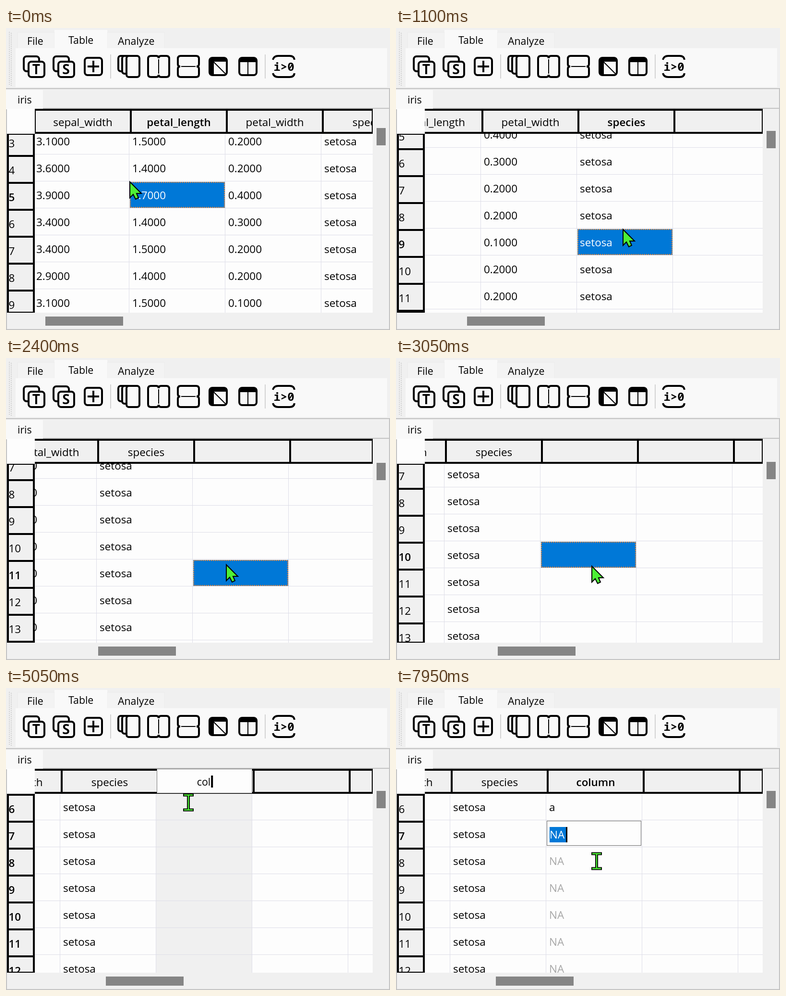
Write an HTML page that moves like this. It is 800 px wide and 628 px high and loops after 8 s.

```html
<!DOCTYPE html>
<html lang="en">
<head>
<meta charset="utf-8">
<title>Table editor</title>
<style>
html, body { margin: 0; width: 800px; height: 628px; overflow: hidden; background: #f0f0f0; }
svg { display: block; font: 22.4px "Open Sans", "Noto Sans", sans-serif; }
text { white-space: pre; }
.tab { font-size: 21.3px; }
.mid { text-anchor: middle; }
.bold { font-weight: 600; }
.na { fill: #a8a8a8; }
.on { fill: #fff; }
.line { fill: none; stroke: #000; stroke-width: 4; stroke-linejoin: round; }
.thin { fill: none; stroke: #000; stroke-width: 2; }
.face { fill: #f9f9f9; stroke: #000; stroke-width: 4; }
.glyph { font: bold 28px "Noto Sans Mono", "DejaVu Sans Mono", monospace; text-anchor: middle; }
.bar { fill: #858585; }
.grid { fill: none; stroke: #dedee8; }
</style>
</head>
<body>
<svg width="800" height="628" viewBox="0 0 800 628">
  <defs>
    <clipPath id="headClip"><rect x="60" y="168" width="704" height="52"/></clipPath>
    <clipPath id="rowClip"><rect x="2" y="220" width="58" height="372"/></clipPath>
    <clipPath id="bodyClip"><rect x="60" y="220" width="704" height="372"/></clipPath>
    <path id="pair" d="M-16-22H-5Q0-22 0-17Q0-22 5-22H16Q22-22 22-16V16Q22 22 16 22H5Q0 22 0 17Q0 22-5 22H-16Q-22 22-22 16V-16Q-22-22-16-22Z"/>
  </defs>

  <rect width="800" height="628" fill="#f0f0f0"/>
  <path d="M7 8V120M11 10V120" stroke="#cfcfcf" stroke-width="2" stroke-dasharray="2 2"/>
  <rect x="20" y="42" width="774" height="81" fill="#f9f9f9"/>
  <path d="M24 42V9H101V42M211 42V9H330V42" fill="#f3f3f3" stroke="#ebebeb"/>
  <path d="M101 44V4H211V44Z" fill="#f9f9f9"/>
  <g class="tab">
    <text x="44" y="35">File</text>
    <text x="130" y="33">Table</text>
    <text x="233" y="35">Analyze</text>
  </g>

  <g class="face">
    <rect x="37" y="59" width="32" height="31" rx="6"/>
    <rect x="47" y="70" width="33" height="32" rx="6"/>
    <rect x="99" y="59" width="32" height="31" rx="6"/>
    <rect x="109" y="70" width="33" height="32" rx="6"/>
    <rect x="164" y="62" width="36" height="36" rx="6"/>
    <rect x="234" y="58" width="26" height="32" rx="5"/>
    <rect x="242" y="58" width="26" height="37" rx="5"/>
    <rect x="251" y="58" width="27" height="44" rx="5"/>
    <use href="#pair" x="318" y="80"/>
    <use href="#pair" transform="translate(380 80) rotate(90)"/>
    <rect x="424" y="62" width="36" height="36" rx="6"/>
    <rect x="486" y="62" width="36" height="36" rx="6"/>
  </g>
  <path class="line" d="M170 80H194M182 68V92M556 66Q558 58 567 58H591Q600 58 601 66M556 94Q558 102 567 102H591Q600 102 601 94"/>
  <path class="thin" d="M318 65V95M365 80H395M432 70L459 97M504 70V97"/>
  <path d="M424 62H460V70H433V98H424ZM486 62H522V71H486Z"/>
  <path d="M218 55V105M540 55V105" stroke="#d3d3d3" stroke-width="2"/>
  <g class="glyph">
    <text x="63" y="96">T</text>
    <text x="125" y="96">S</text>
    <text x="579" y="89" font-size="24" style="font-size:24px">i&gt;0</text>
  </g>

  <path d="M0 126H800M77 167H800M1 167V628M799 126V628M0 627H800" stroke="#c3c3c3" stroke-width="2"/>
  <rect y="129" width="77" height="40" fill="#f9f9f9"/>
  <text class="tab" x="24" y="157">iris</text>

  <rect x="2" y="168" width="762" height="424" fill="#fdfdfd"/>
  <g clip-path="url(#bodyClip)"><g id="body"></g></g>
  <g clip-path="url(#headClip)">
    <rect x="60" y="168" width="704" height="52" fill="#f0f0f0"/>
    <g id="head"></g>
    <path d="M60 170H764M60 218H764" stroke="#000" stroke-width="4"/>
    <path d="M763 168V220" stroke="#000" stroke-width="2"/>
    <g id="nameEdit">
      <rect x="314.5" y="168.5" width="198" height="50" fill="#fdfdfd" stroke="#777"/>
      <text class="tab mid" id="name" x="412" y="203"></text>
      <rect id="nameCaret" y="182" width="4" height="25"/>
    </g>
  </g>
  <g clip-path="url(#rowClip)">
    <rect x="2" y="220" width="58" height="372" fill="#f0f0f0"/>
    <g id="rows"></g>
    <path d="M4 220V592M58 220V592" stroke="#000" stroke-width="4"/>
    <path d="M2 221H60M2 591H60" stroke="#000" stroke-width="2"/>
  </g>
  <rect class="bar" id="hBar" y="600" width="162" height="19"/>
  <rect class="bar" id="vBar" x="772" width="19" height="36"/>

  <path id="arrow" d="M0 0V33L7 26L12 36L18 33L14 24H24Z" fill="#4df035" stroke="#000" stroke-width="2"/>
  <g id="beam" fill="none" stroke-linecap="square">
    <path d="M-8-15.5H8M0-15V15M-8 15.5H8" stroke="#000" stroke-width="6"/>
    <path d="M-8-15.5H8M0-15V15M-8 15.5H8" stroke="#4df035" stroke-width="2.4"/>
  </g>
</svg>
<script>
const $ = id => document.getElementById(id);
const LOOP = 8000, STEP = 50, ROWS = 18, COLS = 9;
const ACTIVE = '#0078d7', TINT = '#f0f0f0';
const titles = ['', 'sepal_width', 'petal_length', 'petal_width', 'species'];
const data = [
  [],
  [3.5, 3, 3.2, 3.1, 3.6, 3.9, 3.4, 3.4, 2.9, 3.1, 3.7, 3.4, 3, 3, 4, 4.4, 3.9, 3.5],
  [1.4, 1.4, 1.3, 1.5, 1.4, 1.7, 1.4, 1.5, 1.4, 1.5, 1.5, 1.6, 1.4, 1.1, 1.2, 1.5, 1.3, 1.4],
  [.2, .2, .2, .2, .2, .4, .3, .2, .2, .1, .2, .2, .1, .1, .2, .4, .4, .3]
];

// time, scroll x, scroll y, pointer x, pointer y
const keys = [
  [0, 0, 0, 258, 320],
  [550, 238, -12, 430, 412],
  [1600, 312, 246, 489, 423],
  [3050, 556, 218, 408, 433],
  [3400, 544, 156, 353, 228],
  [3650, 544, 156, 371, 204],
  [5900, 544, 156, 371, 204],
  [5950, 544, 156, 377, 260],
  [7500, 544, 156, 377, 260],
  [7750, 544, 156, 409, 312],
  [7950, 544, 156, 409, 326]
];

const left = c => 60 + 200 * (c - 1);
const rowTop = r => 38 + 56 * r;
const value = (c, r) => c < 4 ? data[c][r].toFixed(4) : c === 4 ? 'setosa' : '';

function build() {
  let grid = '', cells = '', heads = '', rows = '';
  for (let c = 1; c < COLS; c++) {
    grid += `M${left(c) - 3.5} 0V1100`;
    heads += `<path d="M${left(c)} 168V220" stroke="#000" stroke-width="4"/>
      <text class="mid" id="h${c}" x="${left(c) + 100}" y="204">${titles[c] || ''}</text>`;
  }
  for (let r = 0; r < ROWS; r++) {
    const y = rowTop(r);
    grid += `M0 ${y + .5}H2000`;
    rows += `<path d="M2 ${y + 4}H60" stroke="#000" stroke-width="4"/>
      <text id="r${r}" x="5.5" y="${y + 42}">${r}</text>`;
    for (let c = 1; c < 6; c++)
      cells += `<text id="c${c}_${r}" x="${left(c) + 3}" y="${y + 38}">${value(c, r)}</text>`;
  }
  $('body').innerHTML = `<rect id="sel"/><path class="grid" d="${grid}"/>
    <rect id="focus" width="196" height="52" fill="none" stroke="#ff8728" stroke-width="2" stroke-dasharray="2 2"/>
    ${cells}
    <g id="cellEdit">
      <rect x="2.5" y="2.5" width="196" height="51" fill="#fdfdfd" stroke="#666"/>
      <rect id="mark" x="8" y="15" width="34" height="32" fill="${ACTIVE}"/>
      <text id="cellText" x="8" y="39"></text>
      <rect id="cellCaret" y="15" width="3" height="32"/>
    </g>`;
  $('head').innerHTML = heads;
  $('rows').innerHTML = rows;
}

// Monotone cubic through the keys
function track(t, k) {
  const slope = i => (keys[i + 1][k] - keys[i][k]) / (keys[i + 1][0] - keys[i][0]);
  const last = keys.length - 1;
  const tangent = i => {
    if (i === 0) return slope(0);
    if (i === last) return slope(last - 1);
    const a = slope(i - 1), b = slope(i);
    return a * b > 0 ? 2 * a * b / (a + b) : 0;
  };
  if (t >= keys[last][0]) return keys[last][k];
  let i = 0;
  while (t >= keys[i + 1][0]) i++;
  const d = keys[i + 1][0] - keys[i][0], u = (t - keys[i][0]) / d, v = 1 - u;
  return v * v * (1 + 2 * u) * keys[i][k] + u * u * (3 - 2 * u) * keys[i + 1][k]
    + d * u * v * (v * tangent(i) - u * tangent(i + 1));
}

const show = (id, on) => $(id).style.display = on ? '' : 'none';
const set = (id, attrs) => { for (const a in attrs) $(id).setAttribute(a, attrs[a]); };
const move = (id, x, y) => $(id).setAttribute('transform', `translate(${x} ${y})`);
const between = (t, a, b) => t >= a && t < b;

function selection(t, x, y) {
  if (t < 3400) return [Math.floor((x - 56) / 200) + 1, Math.floor((y - 38) / 56)];
  if (between(t, 5750, 6950)) return [6, 6];
  return [5, t < 7600 ? 6 : 7];
}

function draw(t) {
  const even = v => Math.round(v / 2) * 2;
  const sx = even(track(t, 1)), sy = even(track(t, 2));
  const px = Math.round(track(t, 3)), py = Math.round(track(t, 4));
  const naming = between(t, 4250, 5750);
  const editing = between(t, 7150, 7600) || t >= 7900;
  const column = between(t, 3850, 5750);
  const tint = between(t, 4250, 6950);
  const [sc, sr] = selection(t, px + sx, py + sy);

  move('body', -sx, -sy);
  move('head', -sx, 0);
  move('rows', 0, -sy);
  set('hBar', { x: even(82 + sx * .233) });
  set('vBar', { y: even(208 + Math.max(0, sy) * .04) });

  const x = left(sc) - (tint ? 3 : 2);
  set('sel', {
    x, y: column ? 0 : rowTop(sr) + (tint ? 1 : 2),
    width: left(sc) + 196 - x, height: column ? 1100 : tint ? 55 : 54,
    fill: tint ? TINT : ACTIVE
  });
  set('focus', { x: left(sc) - 1, y: rowTop(sr) + 3 });
  show('sel', !editing);
  show('focus', !column && !tint && !editing);

  for (let c = 1; c < COLS; c++)
    $('h' + c).classList.toggle('bold', c === sc && !between(t, 5750, 6950));
  $('h5').textContent = t >= 5750 ? 'column' : '';

  const allRows = between(t, 3850, 5950);
  for (let r = 0; r < ROWS; r++) {
    $('r' + r).classList.toggle('bold', allRows || r === sr);
    const typed = r === 6 && t >= 7600;
    const cell = $('c5_' + r);
    cell.textContent = typed ? 'a' : t >= 5750 ? 'NA' : '';
    cell.classList.toggle('na', !typed);
    for (let c = 1; c < 6; c++)
      $(`c${c}_${r}`).classList.toggle('on', c === sc && r === sr && !tint);
  }

  show('nameEdit', naming);
  if (naming) {
    const times = [4650, 4800, 4950, 5150, 5250, 5400];
    $('name').textContent = 'column'.slice(0, times.filter(k => t >= k).length);
    set('nameCaret', { x: 412 + $('name').getComputedTextLength() / 2 + 1 });
  }

  show('cellEdit', editing);
  if (editing) {
    const typed = between(t, 7400, 7600);
    move('cellEdit', left(5) - 4, rowTop(sr));
    $('cellText').textContent = typed ? 'a' : 'NA';
    $('cellText').classList.toggle('on', !typed);
    show('mark', !typed);
    set('cellCaret', { x: typed ? 21 : 42 });
  }

  const beam = editing || between(t, 4250, 5950);
  show('beam', beam);
  show('arrow', !beam);
  move('arrow', px, py);
  move('beam', px + 9, py + 34);
}

build();
let shown = -1;
function tick() {
  const t = Math.floor(performance.now() % LOOP / STEP) * STEP;
  if (t !== shown) draw(shown = t);
  requestAnimationFrame(tick);
}
tick();
</script>
</body>
</html>
```
